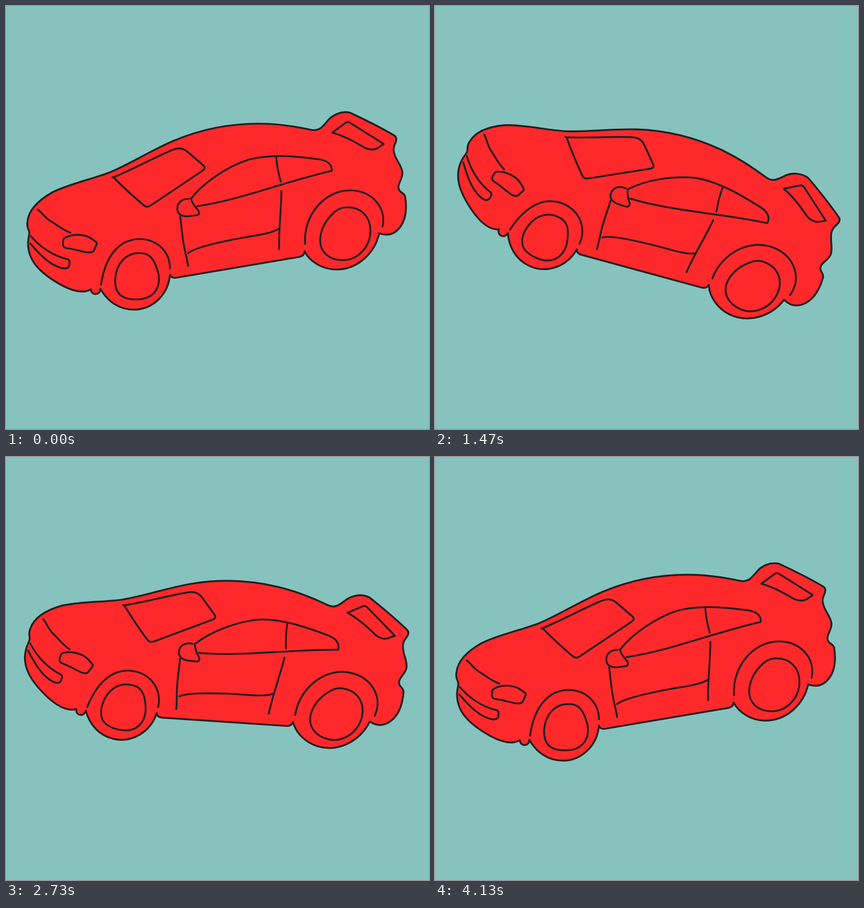
An HTML page for the animation above (4.2 s loop, 748 px wide and 748 px high).

```html
<!DOCTYPE html>
<html lang="en">
<head>
<meta charset="utf-8">
<title>Rocking car</title>
<style>
  html, body { margin: 0; width: 100%; height: 100%; overflow: hidden; background: #86c3be; }
  svg { display: block; width: 100%; height: 100%; }
  path { fill: none; stroke: #231f20; stroke-width: 3.2; stroke-linecap: round; stroke-linejoin: round; }
  .body { fill: #ff292b; }
</style>
</head>
<body>
<svg viewBox="0 0 748 748"><g id="car"></g></svg>
<script>
const LOOP = 4200, STEP = 70, LAG = 20;
const SWING = 26.55, PIVOT = '372 364';

const roof = 'M38 381C40 362 55 345 81 330C110 315 150 307 184 294C222 278 257 255 296 238.5' +
  'C342 219 395 208 446 208C480 208 512 213 540 219C554 222 560 213 567 205';
const tail = 'C576 193 592 185 608 188.5C635 201 661 214 685 228C691 231 691 236 689 241' +
  'C685 250 684 255 688 265C692 275 700 284 701 294C702 304 694 312 694 320' +
  'C694 331 705 329 706 338C709 358 707 378 697 391C687 404 674 407 660 402';
const under = 'C652 437 622 466.5 583 466C560 465.5 538 453 528 434C528 441 523 443 517 444' +
  'L304 480C296 482 291 480 290 475C287 511 259 537 226 537C200 537 179 522 167 500' +
  'C167 512 151 513 150 501';
const nose = 'C138 508 119 505 97 493C60 472 38 450 39 418C39 410 42 405 41 399C39 392 36 390 38 381Z';

const details = {
  windshield: 'M188 303L190 303C228 287 260 269 293 255C304 250 313 251 320 257L348 281' +
    'C353 285 352 288 348 291L257 352C251 356 247 356 242 351C224 336 206 319 190 303',
  spoiler: 'M577 224L600 207C603 204.5 606 205 608.5 206.5L668 244L657 251.5' +
    'C651 255 641 254.5 634 250.5C616 239.5 599 230 577 224Z',
  sideWindow: 'M327 341C350 311 392 284 428 272C468 261 515 266 553 271C569 273 577 281 576 291.5' +
    'C540 300 510 309 487 316C436 331 388 347 338 354',
  mirror: 'M323 341C309 341 302 350 303 360C304 369 311 372 321 372L337 370' +
    'C341 369 342 367 341 363C337 357 329 351 327 340',
  pillar: 'M478 268C479 283 482 297 486 311',
  doorBack: 'M487 327C487 360 482 395 483 430',
  doorFront: 'M308 372C311 395 312 415 317 435C319 444 321 452 322 460',
  crease: 'M322 437C335 426 385 416 420 409.5C448 405 470 402 484 393',
  frontArch: 'M168 493C176 440 201 412 238 412C269 413 290 436 290 464',
  frontHub: 'M238 437C258 437 265 455 270 475C274 505 255 519 230 519C206 519 192 510 193 483C195 455 212 436 238 437',
  rearArch: 'M529 421C525 372 562 326 608 326C647 326 673 356 666 390',
  rearHub: 'M602 356C629 355 644.5 374 644.5 397C644.5 427 621 449.5 596 449.5C572 449.5 555.5 436 555.5 414' +
    'C556 397 564 382 575 370C583 361 591 356 602 356',
  hoodLine: 'M56 360C62 363 68 374 78 380C90 387 100 396 114 401',
  headlight: 'M104 410C119 402 140 403 152 412L159 417C161 418.5 161 420 160 422L156 431' +
    'C154 436 150 436.5 142 435.5C131 433.5 120 429.5 106 428C101 427 100 422 101 417C101 413 102 411 104 410',
  grille: 'M44 407C58 424 82 442 110 448C113 450 113 453 112 459C110 465 104 465 97 463C75 457 57 436 43 420'
};

const car = document.getElementById('car');

function addPath(d, cls) {
  const p = document.createElementNS('http://www.w3.org/2000/svg', 'path');
  p.setAttribute('d', d);
  if (cls) p.setAttribute('class', cls);
  car.append(p);
}

addPath(roof + tail + under + nose, 'body');
Object.values(details).forEach(d => addPath(d));

// cubic-bezier(.25, .1, .25, 1), solved by bisection
function ease(x) {
  let lo = 0, hi = 1;
  for (let i = 0; i < 24; i++) {
    const s = (lo + hi) / 2;
    if (0.75 * s * (1 - s) + s ** 3 < x) lo = s; else hi = s;
  }
  return 0.3 * lo * (1 - lo) ** 2 + 3 * lo * lo * (1 - lo) + lo ** 3;
}

function angleAt(t) {
  const half = LOOP / 2;
  const p = (t - LAG + LOOP) % LOOP;
  return SWING * (p < half ? ease(p / half) : 1 - ease(p / half - 1));
}

function draw(now) {
  const t = Math.floor((now % LOOP) / STEP) * STEP;
  car.setAttribute('transform', `rotate(${angleAt(t).toFixed(3)} ${PIVOT})`);
}

const start = performance.now();
function tick() {
  draw(performance.now() - start);
  requestAnimationFrame(tick);
}
tick();
</script>
</body>
</html>
```
